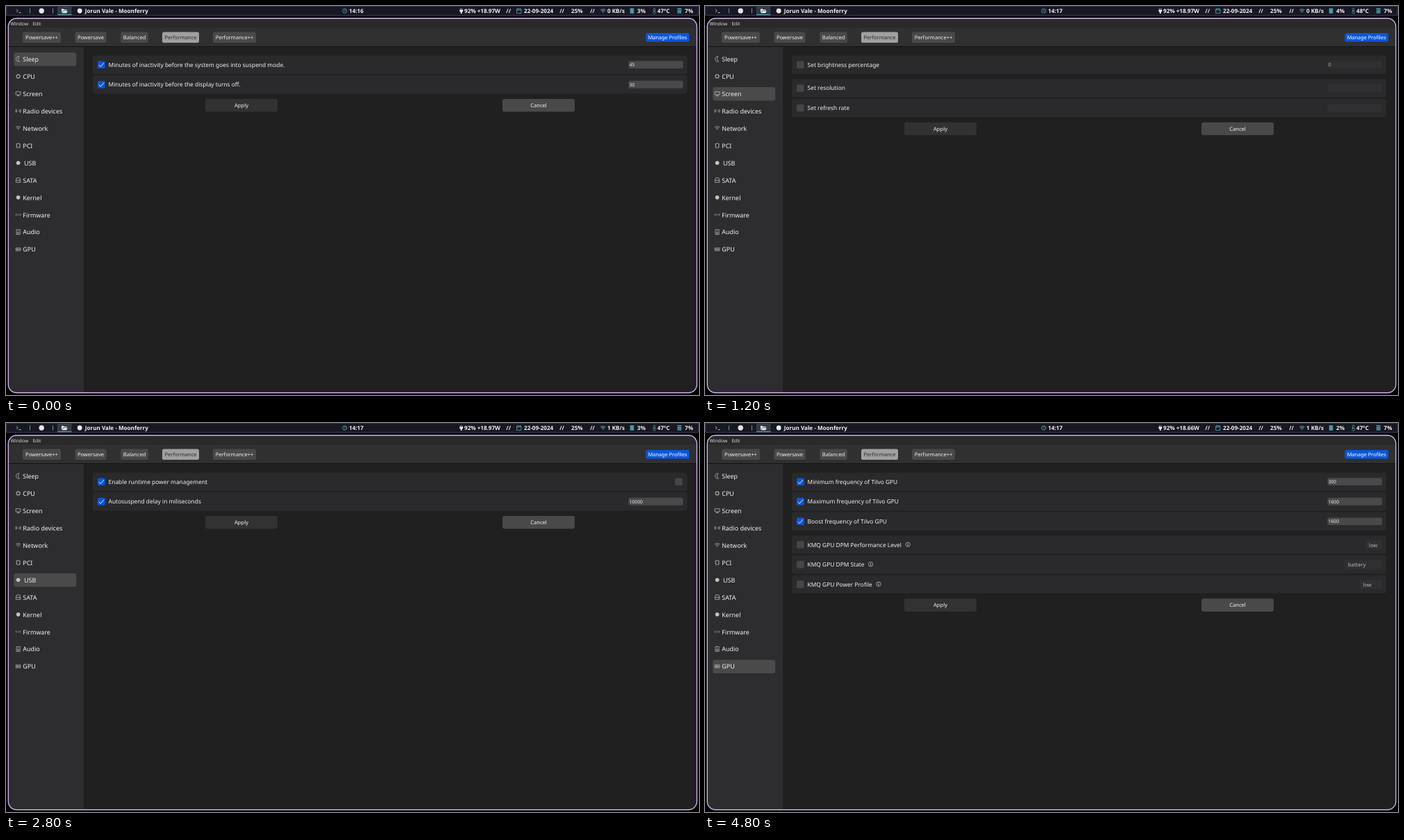
An HTML page for the animation above (5.2 s loop, 998 by 561 pixels).

```html
<!DOCTYPE html>
<html lang="en">
<head>
<meta charset="utf-8">
<title>Power settings tour</title>
<style>
  html, body { margin: 0; width: 100%; height: 100%; overflow: hidden; background: #000; }
  svg { display: block; width: 100%; height: 100%; }
  text { font-family: "Noto Sans", sans-serif; white-space: pre; text-rendering: geometricPrecision; }
</style>
</head>
<body>
<svg id="stage" viewBox="0 0 998 561"></svg>
<script>
const STEP = 400, BLUE = '#0a57dc', TEAL = '#4a9ba3', GREY = '#494949', WHITE = '#f2f2f2';
const SCROLL = 357;
const measure = document.createElement('canvas').getContext('2d');

// Drawing helpers; text is centred vertically on its capitals.
const rect = (x, y, w, h, fill, r = 0) =>
  `<rect x="${x}" y="${y}" width="${w}" height="${h}" rx="${r}" fill="${fill}"/>`;
const circle = (x, y, r, fill) => `<circle cx="${x}" cy="${y}" r="${r}" fill="${fill}"/>`;
const line = (d, stroke, width = 0.8) =>
  `<path d="${d}" fill="none" stroke="${stroke}" stroke-width="${width}"/>`;
const text = (x, y, s, size = 8.4, fill = WHITE, extra = '') =>
  `<text x="${x}" y="${y + size * 0.357}" font-size="${size}" fill="${fill}" ${extra}>${s}</text>`;
const bold = (x, y, s, size = 8.1, extra = '') =>
  text(x, y, s, size, WHITE, `font-weight="700" ${extra}`);
const middle = 'text-anchor="middle"';
const at = (x, y, body) => `<g transform="translate(${x} ${y})">${body}</g>`;

function textWidth(s, size) {
  measure.font = '100px "Noto Sans", sans-serif';
  return measure.measureText(s).width * size / 100;
}

function checkbox(x, y, on) {
  return rect(x - 5.3, y - 5.3, 10.6, 10.6, on ? BLUE : '#464646', 1.5) +
    (on ? line(`M${x - 3.7} ${y + 0.4}l2.5 2.5 5-5.6`, '#fff', 0.9) : '');
}

function infoIcon(x, y) {
  return at(x, y, '<circle r="3.2" fill="none" stroke="#ccc" stroke-width=".7"/>' +
    line('M0 -.5V2M0 -1.9V-1.1', '#ddd', 0.9));
}

// A control is a boolean (checkbox), a string (input) or { pick, x } (drop-down).
function control(y, value, enabled) {
  if (typeof value === 'boolean') return checkbox(968.8, y, value);
  const fill = enabled ? GREY : '#303032', ink = enabled ? WHITE : '#b5b5b5';
  if (typeof value === 'string')
    return rect(896.5, y - 5.4, 78.5, 10.8, fill, 2) + text(897.7, y + 0.3, value, 6.7, ink);
  return rect(value.x, y - 6.5, 975 - value.x, 13, fill, 2) +
    text(value.x + 5, y + 0.3, value.pick, 7.55, ink);
}

function settingRow(y, [label, on, value]) {
  const info = label.endsWith('*'), name = label.replace('*', '');
  return rect(125, y - 13.2, 856, 26.4, '#2a2a2d', 3) + checkbox(137.3, y, on) +
    text(147.6, y, name) +
    (info ? infoIcon(156.4 + textWidth(name, 8.4), y - 0.3) : '') + control(y, value, on);
}

const buttons = y =>
  rect(287, y - 9.3, 104, 18.6, '#323233', 3) + text(339, y, 'Apply', 7.6, WHITE, middle) +
  rect(715, y - 9.3, 104, 18.6, GREY, 3) + text(767, y, 'Cancel', 7.6, WHITE, middle);

function settingsPage(groups) {
  let y = 84.7, out = '';
  for (const group of groups) {
    for (const row of group) {
      out += settingRow(y, row);
      y += 28.55;
    }
    y += 5.2;
  }
  return out + buttons(y - 3.8);
}

const currents = { 4: 931, 6: 1193, 8: 1358, 9: 1453, 10: 921, 12: 965, 14: 1038, 17: 1086 };

function coreRow(i, hovered) {
  const y = SCROLL + (i ? 117.6 + (i - 1) * 21.3 : 98);
  const performance = i < 16;
  const name = performance ? `P (${i >> 1} - ${i})` : `E (${i - 8} - ${i})`;
  const top = performance ? 5300 : 3900;
  const limit = i >= 8 && i < 12 ? 5500 : top;
  const small = (x, s) => rect(x, y - 4.6, 20, 10.4, GREY, 2) + text(x + 1.2, y + 0.8, s, 6.7);
  const select = (x, w, s) => rect(x, y - 6.4, w, 13, GREY, 2) + text(x + 2.8, y + 0.3, s, 7.55);
  return (hovered ? rect(125, y - 10.7, 856, 21.3, '#505050', 4) : '') +
    (i ? checkbox(166.3, y - 0.8, true) : '') + text(194.3, y, name) +
    small(278, 800) + small(387.2, top) +
    text(499, y, performance ? 2100 : 1500) + text(548, y, currents[i] || 800) +
    text(621, y, `800-${limit}`) +
    select(700.3, 51.5, 'powersave') + select(812, 82.8, 'balance_performance');
}

function cpuPage(scroll, hoveredCore) {
  const heads = [[160.3, 'On'], [194.3, 'CPU'], [278, 'Current Min'], [387.2, 'Current Max'],
    [499, 'Base'], [548, 'Current'], [621, 'Range'], [700.3, 'Governor'], [812, 'EPP']];
  const body = settingsPage([
    [['Set scaling driver operation mode*', true, { pick: 'active', x: 930 }]],
    [['Set governor*', true, { pick: 'powersave', x: 923 }],
     ['Set EPP*', true, { pick: 'balance_performance', x: 886 }]],
    [['Minimum frequency (MHz)', false, '800'], ['Maximum frequency (MHz)', false, '5300']],
    [['Minimum performance percentage*', true, '8'], ['Maximum performance percentage*', true, '100']],
    [['Enable turbo boost', true, true], ['Enable HWP dynamic boost*', true, true]]
  ]) + bold(125, SCROLL + 52, 'Per core settings', 14) +
    heads.map(([x, s]) => bold(x, SCROLL + 80, s, 8.3)).join('') +
    Array.from({ length: 24 }, (_, i) => coreRow(i, i === hoveredCore)).join('') +
    buttons(SCROLL + 620);
  return at(0, -scroll, body) +
    rect(990.5, 59 + scroll * 0.524, 3, 261, GREY, 1.5);
}

const pages = [
  { tab: 0, body: settingsPage([[
    ['Minutes of inactivity before the system goes into suspend mode.', true, '45'],
    ['Minutes of inactivity before the display turns off.', true, '30']]]) },
  { tab: 1, body: cpuPage(0) },
  { tab: 1, body: cpuPage(SCROLL, 19) },
  { tab: 2, body: settingsPage([
    [['Set brightness percentage', false, '0']],
    [['Set resolution', false, ''], ['Set refresh rate', false, '']]]) },
  { tab: 3, body: settingsPage([[
    ['Block WiFi', true, false], ['Block Bluetooth', true, false], ['Block NFC', true, false]]]) },
  { tab: 4, body: settingsPage([
    [['Disable Ethernet*', true, false]],
    [['Disable WiFi 7', true, false], ['Disable WiFi 6', true, false], ['Disable WiFi 5', true, false]],
    [['Enable WiFi driver powersaving*', true, false], ['Enable U-APSD*', true, false]],
    [['WiFi driver power level (0-5)*', true, '5'], ['WiFi driver power scheme (1-3)*', true, '1']]]) },
  { tab: 5, body: settingsPage([[
    ['Set ASPM operation mode*', true, { pick: 'performance', x: 916 }],
    ['Enable runtime power management', true, false]]]) },
  { tab: 6, body: settingsPage([[
    ['Enable runtime power management', true, false],
    ['Autosuspend delay in miliseconds', true, '10000']]]) },
  { tab: 7, body: settingsPage([[
    ['Set active link power management policy*', true, { pick: 'max_performance', x: 898 }]]]) },
  { tab: 8, body: settingsPage([
    [['Disable NMI watchdog*', true, true]],
    [['VM writeback in seconds*', true, '15'], ['Laptop Mode*', true, '2']]]) },
  { tab: 9, body: settingsPage([[
    ['Set ACPI platform profile*', true, { pick: 'performance', x: 916 }]]]) },
  { tab: 10, body: settingsPage([[
    ['Audio module idle timeout in seconds', true, '0']]]) },
  { tab: 11, body: settingsPage([
    [['Minimum frequency of Tilvo GPU', true, '300'], ['Maximum frequency of Tilvo GPU', true, '1600'],
     ['Boost frequency of Tilvo GPU', true, '1600']],
    [['KMQ GPU DPM Performance Level*', false, { pick: 'low', x: 951 }],
     ['KMQ GPU DPM State*', false, { pick: 'battery', x: 921 }],
     ['KMQ GPU Power Profile*', false, { pick: 'low', x: 942.5 }]]]) }
];

// Sidebar entries: label and icon outline around its centre.
const box = (w, h) => `M${-w} ${-h}H${w}V${h}H${-w}Z`;
const waves = 'M-1.6 -1.6Q-2.8 0 -1.6 1.6M1.6 -1.6Q2.8 0 1.6 1.6M-.3 0H.3';
const wifi = 'M-3.5 -1.5Q0 -4.3 3.5 -1.5M-2.2 .2Q0 -1.6 2.2 .2M0 1V2.6';
const tabs = [
  ['Sleep', 'M1.5 -3.6A3.7 3.7 0 1 0 2 3.4A4.2 4.2 0 0 1 1.5 -3.6'],
  ['CPU', box(2, 2) + 'M-1 -3.4V-2M1 -3.4V-2M-1 2V3.4M1 2V3.4M-3.4 -1H-2M-3.4 1H-2M2 -1H3.4M2 1H3.4'],
  ['Screen', 'M-3.4 -2.7H3.4V1.6H-3.4ZM0 1.6V3.2M-1.8 3.2H1.8'],
  ['Radio devices', waves + 'M-3 -2.6Q-4.4 0 -3 2.6M3 -2.6Q4.4 0 3 2.6'],
  ['Network', wifi],
  ['PCI', box(2.2, 3) + 'M-3.2 -1.5H-2.2M-3.2 1H-2.2M2.2 -1.5H3.2M2.2 1H3.2'],
  ['USB'],
  ['SATA', 'M-3.2 0L-2.2 -3.2H2.2L3.2 0V3.2H-3.2ZM-3.2 .2H3.2M1 1.8H2'],
  ['Kernel'],
  ['Firmware', 'M-2.3 -1.6L-3.6 0L-2.3 1.6M2.3 -1.6L3.6 0L2.3 1.6M-1.2 0H1.2'],
  ['Audio', box(2.6, 3.4) + 'M-1.2 1A1.2 1.2 0 1 0 1.2 1A1.2 1.2 0 1 0 -1.2 1M-.4 -2H.4'],
  ['GPU', box(3.3, 2) + 'M-1.8 -.8H-.4V.8H-1.8ZM.8 -.8V.8M2 -.8V.8']
];

const sidebar = tabs.map(([label, icon], i) => {
  const y = 76.8 + i * 24.95;
  return at(17.6, y - 0.3, icon ? line(icon, '#c4c4c4', 0.7) : circle(0, 0, 2.8, '#c4c4c4')) +
    text(label === 'USB' ? 26 : 24.3, y, label, 8.95);
}).join('');

const profiles = [[24, 55, 'Powersave++'], [99.5, 45, 'Powersave'], [165.3, 39.5, 'Balanced'],
  [225, 53, 'Performance'], [298, 62, 'Performance++']].map(([x, w, label], i) =>
  rect(x, 37.5, w, 15.6, i === 3 ? '#a0a0a0' : GREY, 2.5) +
  text(x + w / 2, 45.2, label, 7.55, i === 3 ? '#2c2c2c' : WHITE, middle)).join('');

const statusBar =
  rect(0, 0, 998, 14, '#3b3c52', 2) + rect(1, 0.8, 996, 12.2, '#181824', 2) +
  line('M15 4.6l2.2 2.2-2.2 2.2M18.4 9.6h3.4', '#ddd') +
  line('M34.5 3.5V10.5', TEAL, 1) + line('M67.5 3.5V10.5', '#7d8fa0', 1) +
  circle(51.2, 7, 3.7, '#e8e8e8') +
  rect(74, 1, 20.5, 12, '#323c49') + rect(74, 12, 20.5, 1.2, TEAL) +
  '<path d="M80 10V4.2h2.8l1 1h3.7v1.3h-5.3z M80.8 10.2l1.7-3h6.3l-1.7 3z" fill="#eee"/>' +
  circle(106.2, 7, 3.4, '#eee') + bold(113.8, 6.7, 'Jorun Vale - Moonferry') +
  at(487.8, 7, `<circle r="3" fill="none" stroke="${TEAL}"/>` + line('M0 -1.8V.2H1.4', TEAL)) +
  '<path d="M653.2 5.6h5v1.8l-1.6 1.6v2h-1.8V9l-1.6-1.6z" fill="#eee"/>' +
  line('M654.6 3.4v2.2M656.8 3.4v2.2', '#eee') +
  [720.3, 797.2, 841.2].map(x => bold(x, 6.7, '//')).join('') +
  line('M735.5 4.4h6.4v6h-6.4zM735.5 6h6.4M737.2 3v2M740.2 3v2', TEAL, 0.9) +
  bold(746, 6.7, '22-09-2024') + bold(814, 6.7, '25%') +
  at(859.8, 7.5, line(wifi, TEAL, 1.2)) +
  rect(899, 3.2, 5, 7.6, TEAL, 0.6) + line('M898 4.5h7M898 7h7M898 9.5h7', TEAL, 0.7) +
  line('M932.6 8V4.2a1.1 1.1 0 0 1 2.2 0V8a1.8 1.8 0 1 1 -2.2 0zM933.7 6v3', TEAL, 0.8) +
  rect(966.6, 3.2, 6.4, 2, TEAL, 1) + rect(966.6, 5.9, 6.4, 2, TEAL, 1) + rect(966.6, 8.6, 6.4, 2, TEAL, 1) +
  bold(977.5, 6.7, '7%');

// Readings that vary from step to step, one digit per step.
const network = '0110100110111', load = '3324333333332', heat = '7888888777777';

const readings = i =>
  bold(494, 6.7, i ? '14:17' : '14:16') +
  bold(660, 6.7, `92% +18.${i < 9 ? 97 : 66}W`) +
  bold(866, 6.7, `${network[i]} KB/s`) + bold(909, 6.7, `${load[i]}%`) +
  bold(938, 6.7, `4${heat[i]}°C`);

const stage = document.getElementById('stage');
stage.innerHTML =
  `<defs><clipPath id="window">${rect(3.5, 18, 991, 539.5, '#000', 12)}</clipPath>
   <clipPath id="content">${rect(112, 59, 882, 498, '#000')}</clipPath></defs>` +
  rect(0, 0, 998, 561, '#000') + statusBar +
  `<g clip-path="url(#window)">` + rect(3, 17, 992, 541, '#202020') +
  rect(3, 17, 992, 15, '#29292a') + rect(3, 32, 992, 26, '#303030') +
  line('M3 32H995', '#383838', 0.6) + rect(3, 59, 109, 499, '#2d2d30') +
  line('M3 58.5H995', '#121212', 1) + `</g>` +
  text(6.8, 25.5, 'Window', 6.7, '#ddd') + text(38.4, 25.5, 'Edit', 6.7, '#ddd') +
  profiles + rect(921.5, 39, 62.5, 12.6, BLUE, 2.5) +
  text(952.7, 45.1, 'Manage Profiles', 7.4, '#fff', middle) +
  '<rect id="selection" x="11.3" width="90" height="19.6" rx="3.5" fill="#4a4a4a"/>' + sidebar +
  pages.map((page, i) => `<g class="page">${readings(i)}<g clip-path="url(#content)">${page.body}</g></g>`).join('') +
  '<rect x="3.3" y="17.8" width="991.6" height="540" rx="12" fill="none" stroke="#d0b0ee" stroke-width="1.4"/>';

const views = stage.querySelectorAll('.page');
const selection = document.getElementById('selection');
const start = performance.now();

function frame() {
  const step = Math.floor((performance.now() - start) / STEP) % pages.length;
  views.forEach((view, i) => view.setAttribute('display', i === step ? 'inline' : 'none'));
  selection.setAttribute('y', 67 + pages[step].tab * 24.95);
  requestAnimationFrame(frame);
}
frame();
</script>
</body>
</html>
```
